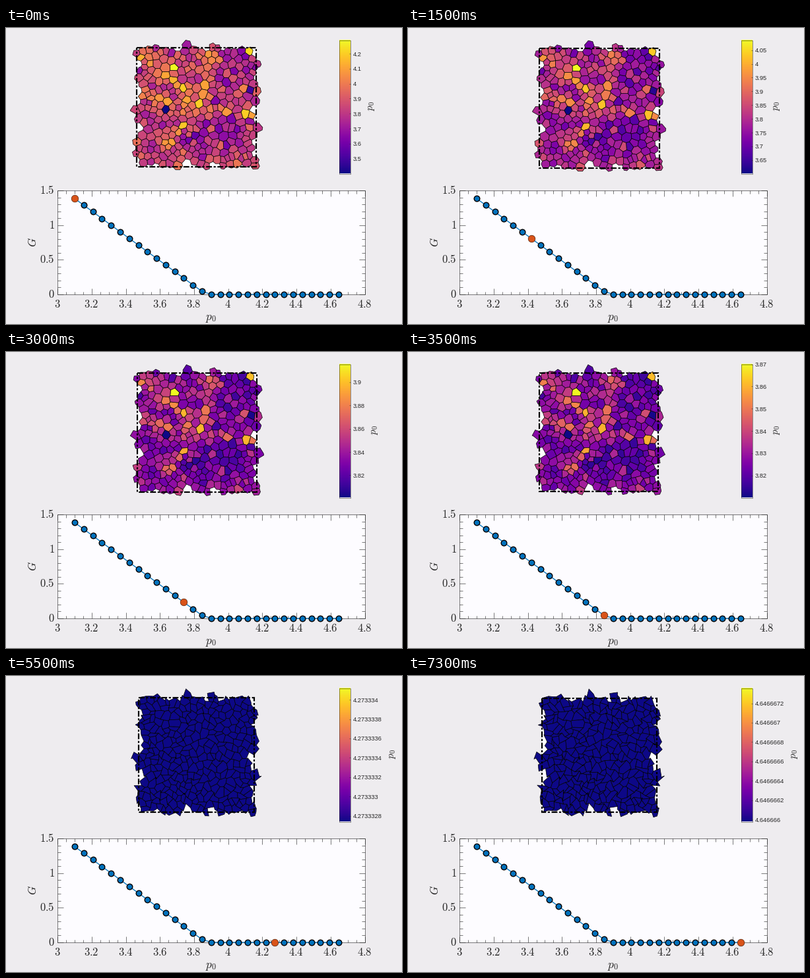
A matplotlib script that plays this animation: 600x450 px, repeating every 7.5 s.

```python
import numpy as np
import matplotlib.pyplot as plt
from matplotlib.animation import FuncAnimation
from matplotlib.collections import LineCollection, PolyCollection
from matplotlib.patches import Rectangle
from matplotlib.tri import Triangulation

plt.rcParams["mathtext.fontset"] = "cm"
PT = 0.72  # points per pixel at 100 dpi
INK = "#262626"
STEPS, CELLS = 30, 300
FLUID = 15  # first step without rigidity
P0 = 3.1 + np.arange(STEPS) * 0.16 / 3
G = 0.02 * np.log1p(np.exp((1.385 - 1.8 * (P0 - 3.1)) / 0.02))
CMAP = plt.get_cmap("plasma")
rng = np.random.default_rng(11)


# ---- periodic cell packing in the unit square ----
def tessellate(pts):
    """Return triangles and their circumcentres for the 3x3 tiled points."""
    shifts = [(0, 0)] + [(i, j) for i in (-1, 0, 1) for j in (-1, 0, 1) if i or j]
    tiled = np.vstack([pts + s for s in shifts])
    tris = Triangulation(*tiled.T).triangles
    a, b, c = (tiled[tris[:, i]] for i in range(3))
    b, c = b - a, c - a
    d = 2 * (b[:, 0] * c[:, 1] - b[:, 1] * c[:, 0])
    d = np.where(np.abs(d) < 1e-12, 1e-12, d)
    bb, cc = (b ** 2).sum(1), (c ** 2).sum(1)
    centre = a + np.c_[(c[:, 1] * bb - b[:, 1] * cc) / d,
                       (b[:, 0] * cc - c[:, 0] * bb) / d]
    return tris, centre


def relax(pts, rounds):
    for _ in range(rounds):
        tris, centre = tessellate(pts)
        total, count = np.zeros((CELLS, 2)), np.zeros(CELLS)
        for i in range(3):
            own = tris[:, i] < CELLS
            np.add.at(total, tris[own, i], centre[own])
            np.add.at(count, tris[own, i], 1)
        pts = (total / count[:, None]) % 1
    return pts


def wavy_wrap(main, cross, waves, crest):
    """Wrap at a wavy seam, so that border cells stick out in places."""
    seam = -0.03 * np.cos(2 * np.pi * waves * (cross - crest))
    return (main - seam) % 1 + seam


def distort(p, amount):
    """Periodic pseudo-random vertex displacement."""
    u, v = 2 * np.pi * p.T
    return p + amount * np.c_[np.sin(23 * u + 17 * v + 1), np.sin(19 * u - 27 * v + 2)]


seeds = relax(rng.random((CELLS, 2)), 18)
tris, centre = tessellate(seeds)
placed = np.c_[wavy_wrap(*seeds.T, 3.6, 0.28), wavy_wrap(*seeds.T[::-1], 4, 0.16)]
polygons = []
for i in range(CELLS):
    ring = centre[(tris == i).any(1)]
    rel = ring - seeds[i]
    polygons.append(ring[np.argsort(np.arctan2(rel[:, 1], rel[:, 0]))] + placed[i] - seeds[i])


# ---- cell values: bright arms around a hub, dark patches, noise ----
def arm_distance(a, b):
    a, b = np.array(a), np.array(b)
    t = np.clip((placed - a) @ (b - a) / ((b - a) ** 2).sum(), 0, 1)
    return np.hypot(*(placed - a - t[:, None] * (b - a)).T)


HUB = (0.53, 0.5)
arm_tips = [(0.06, 0.06), (0.62, 0.08), (0.94, 0.54), (0.24, 0.82), (0.05, 0.4)]
value = 0.47 + rng.normal(0, 0.09, CELLS)
value += 0.24 * np.exp(-(np.min([arm_distance(HUB, tip) for tip in arm_tips], 0) / 0.05) ** 2)
for patch in [(0.45, 0.74), (0.74, 0.66), (0.82, 0.1)]:
    value -= 0.13 * np.exp(-(arm_distance(patch, np.add(patch, 0.01)) / 0.11) ** 2)
for spot, level in [((0.28, 0.18), 1), ((0.36, 0.65), 0.88), ((0.94, 0.54), 0.9),
                    ((0.93, -0.03), 0.92), ((0.26, 0.5), 0), ((0.94, 0.34), 0.1)]:
    value[((placed - spot) ** 2).sum(1).argmin()] = level
value = np.clip(value, 0, 1)


# ---- colour scale ----
def colour_range(k):
    if k < FLUID:
        return min(3.4 + 0.0334 * k, 3.81), np.interp(k, [0, 3, 8, 14], [4.29, 4.207, 4.006, 3.87])
    span = 6e-3 if k < 17 else 7.15e-6 if k < 19 else 1.38e-6
    low = P0[k] - span * np.interp(k, [17, 22, 29], [0.58, 0.43, 0.5])
    return low, low + span


def scale_ticks(low, high):
    step, digits = next((m * 10.0 ** -e, e) for e in range(9, -1, -1) for m in (1, 2, 5)
                        if (high - low) / (m * 10.0 ** -e) < 10)
    ticks = np.arange(np.floor(low / step + 1e-6) + 1, np.floor(high / step) + 1) * step
    names = [f"{t:.{digits}f}" for t in ticks]
    return ticks, [n.rstrip("0").rstrip(".") if "." in n else n for n in names]


# ---- stage in pixel coordinates ----
fig = plt.figure(figsize=(6, 4.5), dpi=100, facecolor="#eeecef")
ax = fig.add_axes([0, 0, 1, 1])
ax.axis("off")

frame_fill = ax.add_patch(Rectangle((0, 0), 1, 1, fc="#fdfcff", ec="none"))
cells = ax.add_collection(PolyCollection(polygons, edgecolors="black", linewidths=0.7 * PT))
frame_line = ax.add_patch(Rectangle((0, 0), 1, 1, fill=False, ec="black", lw=2.2 * PT,
                                    ls=(0, (4, 1.2, 1.4, 1.2)), zorder=3))

BAR_TOP, BAR_BOTTOM = 18.5, 221.5
ax.imshow(np.linspace(1, 0, 256)[:, None], cmap=CMAP, aspect="auto",
          extent=(505, 522, BAR_BOTTOM, BAR_TOP))
ax.add_patch(Rectangle((505, BAR_TOP), 17, BAR_BOTTOM - BAR_TOP, fill=False,
                       ec=INK, lw=0.5 * PT, zorder=3))
bar_marks = ax.add_collection(LineCollection([], colors=INK, linewidths=0.5 * PT, zorder=4))
bar_names = [ax.text(526, 0, "", family="Liberation Sans", size=9.4 * PT, color=INK,
                     va="center_baseline") for _ in range(12)]
bar_title = ax.text(553, 119, "$p_0$", size=15 * PT, color=INK, rotation=90,
                    ha="center", va="center")

# ---- lower plot ----
LEFT, RIGHT, TOP, BOTTOM = 78.2, 543.5, 247.2, 405


def px(x):
    return LEFT + (x - 3) / 1.8 * (RIGHT - LEFT)


def py(y):
    return BOTTOM - y / 1.5 * (BOTTOM - TOP)


ax.add_patch(Rectangle((LEFT, TOP), RIGHT - LEFT, BOTTOM - TOP, fc="#fdfcff",
                       ec=INK, lw=0.6 * PT))
marks = []
for i in range(37):
    x, size = px(3 + i * 0.05), 4.5 if i % 4 else 9
    marks += [[(x, BOTTOM), (x, BOTTOM - size)], [(x, TOP), (x, TOP + size)]]
    if i % 4 == 0:
        ax.text(x - 0.5, 420.3, f"${3 + i * 0.05:.3g}$", size=16.5 * PT, color=INK,
                ha="center", va="center")
for i in range(16):
    y, size = py(i * 0.1), 4.5 if i % 5 else 9
    marks += [[(LEFT, y), (LEFT + size, y)], [(RIGHT, y), (RIGHT - size, y)]]
    if i % 5 == 0:
        ax.text(73.5, y, f"${i * 0.1:.2g}$", size=16.5 * PT, color=INK,
                ha="right", va="center")
ax.add_collection(LineCollection(marks, colors=INK, linewidths=0.6 * PT))
ax.text(310.5, 441, "$p_0$", size=17.5 * PT, color=INK, ha="center", va="center")
ax.text(40.5, 325.5, "$G$", size=17 * PT, color=INK, rotation=90, ha="center", va="center")
ax.plot(px(P0), py(G), "-o", color="#0072bd", lw=1.3 * PT, ms=8.6 * PT,
        mec="black", mew=1.4 * PT, zorder=5)
current, = ax.plot([], [], "o", color="#d95319", ms=10.6 * PT, mec="#5a2a14",
                   mew=0.7 * PT, zorder=6)
ax.set(xlim=(0, 600), ylim=(450, 0))


def update(frame):
    # two steps per half second, held for 300 and 200 ms
    k = 2 * (frame // 5) + (frame % 5 >= 3)

    x = np.interp(k, [0, 14, 29], [198.2, 199, 203.2])
    y = 30 + 0.13 * k
    side = np.interp(k, [0, 10, 22, 29], [180.5, 183, 174.5, 173.5])
    for box in (frame_fill, frame_line):
        box.set_bounds(x, y, side, side)
    amount = 0.02 * max(0, (k - 10) / 19) ** 0.7
    cells.set_verts([distort(p, amount) * side + [x, y] for p in polygons])
    cells.set_facecolor(CMAP(value ** (1 + 0.06 * k) if k < FLUID else 0 * value))

    low, high = colour_range(k)
    ticks, names = scale_ticks(low, high)
    heights = BAR_BOTTOM - (ticks - low) / (high - low) * (BAR_BOTTOM - BAR_TOP)
    bar_marks.set_segments([[(520, h), (522, h)] for h in heights])
    for label in bar_names:
        label.set_text("")
    for label, name, height in zip(bar_names, names, heights):
        label.set_text(name)
        label.set_y(height)
    bar_title.set_x(537.5 + 5.35 * (max(map(len, names)) - 0.1))

    current.set_data([px(P0[k])], [py(G[k])])
    return cells, current


anim = FuncAnimation(fig, update, frames=75, interval=100, repeat=True, repeat_delay=0)
plt.show()
```
